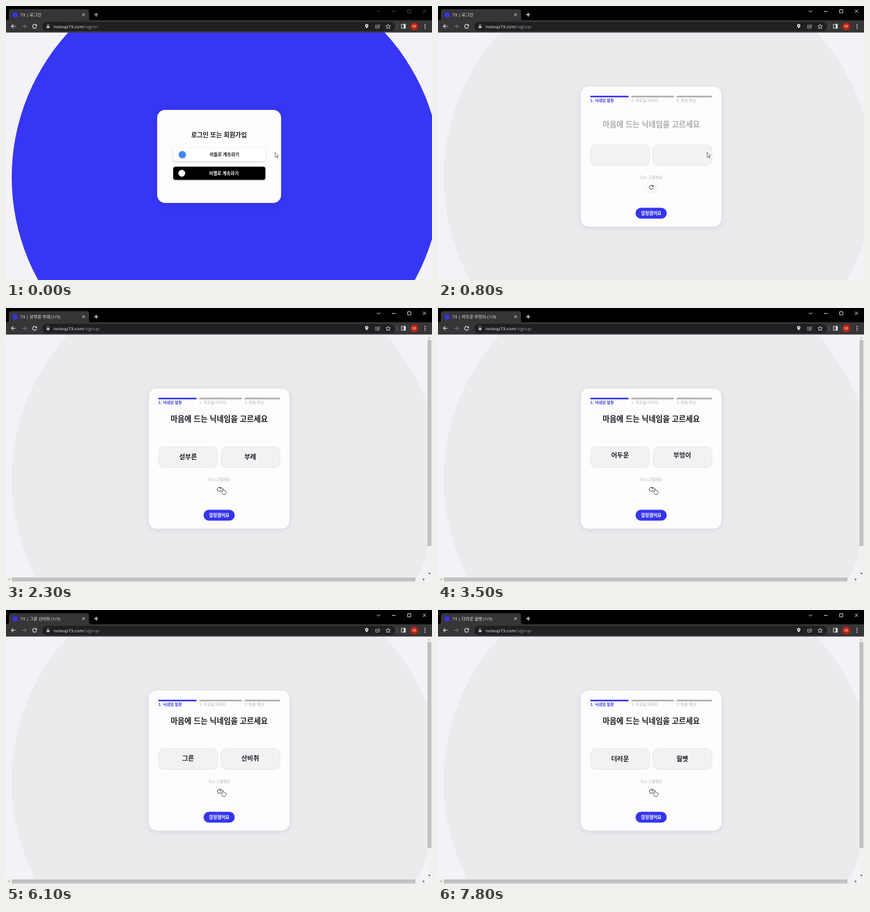
An HTML page that plays this animation: 744x480 px, repeating every 8 s.

```html
<!DOCTYPE html>
<html lang="ko">
<head>
<meta charset="utf-8">
<title>Nickname picker</title>
<style>
  html, body { margin: 0; width: 744px; height: 480px; overflow: hidden; background: #f4f2f6; }
  svg { display: block; }
  text { font-family: "Noto Sans CJK KR", "Noto Sans CJK", "Noto Sans", sans-serif; }
  .ui { font-family: "Open Sans", "Noto Sans CJK KR", sans-serif; }
  .b { font-weight: 700; }
  .mid { text-anchor: middle; }
  .ln { fill: none; stroke-width: 1; }
  .card { fill: #fefcff; filter: drop-shadow(0 2px 5px rgba(40, 40, 60, .1)); }
  .slot { fill: #f2f1f4; stroke: #e6e5e8; }
  .word { font-size: 11.2px; fill: #1c1b1f; }
</style>
</head>
<body>
<svg width="744" height="480" viewBox="0 0 744 480">
  <defs>
    <clipPath id="slots">
      <rect x="266" y="243" width="104" height="37" rx="9"/>
      <rect x="375" y="243" width="104" height="37" rx="9"/>
    </clipPath>
  </defs>

  <rect width="744" height="480" fill="#f4f2f6"/>
  <circle id="mark" cx="385" cy="300" r="375"/>

  <g id="signin">
    <rect class="card" x="264" y="182" width="216.5" height="163" rx="14"/>
    <text class="b mid" x="372" y="230" font-size="11" fill="#1c1b1f">로그인 또는 회원가입</text>
    <rect x="292" y="249" width="161" height="23" rx="4" fill="#fff" style="filter:drop-shadow(0 1px 1.5px rgba(0,0,0,.22))"/>
    <circle cx="308" cy="260.5" r="6.5" fill="#4285f4"/>
    <text class="b mid" x="381.5" y="263.4" font-size="7.7" fill="#1c1b1f">라둘로 계속하기</text>
    <rect x="292" y="281.5" width="161" height="23" rx="4" style="filter:drop-shadow(0 1px 1.5px rgba(0,0,0,.22))"/>
    <circle cx="307" cy="293" r="6" fill="#fff"/>
    <text class="b mid" x="380.5" y="296.2" font-size="7.7" fill="#fff">미젤로 계속하기</text>
  </g>

  <g id="signup">
    <rect class="card" x="249.5" y="141" width="245.5" height="245.5" rx="14"/>
    <rect x="266" y="157.3" width="67" height="2.6" rx="1" fill="#3435f0"/>
    <rect x="337.5" y="157.3" width="74.5" height="2.6" rx="1" fill="#adacaf"/>
    <rect x="416.5" y="157.3" width="62" height="2.6" rx="1" fill="#adacaf"/>
    <g class="b" font-size="6.75" fill="#adacaf">
      <text x="266" y="168.4" fill="#3435f0">1. 닉네임 설정</text>
      <text x="337.5" y="168.4" font-weight="500">2. 프로필 이모지</text>
      <text x="416.5" y="168.4" font-weight="500">3. 최종 확인</text>
    </g>
    <text id="heading" class="b mid" x="372.3" y="199" font-size="13.25" fill="#1c1b1f">마음에 드는 닉네임을 고르세요</text>
    <rect class="slot" x="266.5" y="243" width="103" height="36.5" rx="9"/>
    <rect class="slot" x="375.5" y="243" width="103" height="36.5" rx="9"/>
    <g clip-path="url(#slots)">
      <g id="words" class="b mid">
        <text id="left" class="word" x="318" y="265.2"></text>
        <text id="right" class="word" x="426.5" y="265.2"></text>
      </g>
    </g>
    <text class="mid" x="372.3" y="303.2" font-size="6.7" fill="#b3b2b6">다시 고를래요</text>
    <circle id="disc" cx="372.5" cy="317.5" r="8" fill="#fff"/>
    <g id="reload" class="ln" stroke="#1c1b1f">
      <path d="M375.6 315.9A3.5 3.5 0 1 0 376 318.3"/>
      <path d="M376.3 313.3V316.6H373Z" fill="#1c1b1f" stroke="none"/>
    </g>
    <rect x="345" y="353.5" width="54.5" height="19" rx="9.5" fill="#3435f0"/>
    <text class="b mid" x="372.3" y="366" font-size="7.8" fill="#fff">결정했어요</text>
  </g>

  <g id="bars">
    <path d="M735 46h9v434H0v-9h735Z" fill="#f1f1f1"/>
    <path d="M736 56h7v361h-7ZM10 472h705v7H10Z" fill="#c1c1c1"/>
    <path d="M737.3 53.3h4.4l-2.2-2.6ZM6.3 473.3v4.4l-2.6-2.2Z" fill="#a3a3a3"/>
    <path d="M737.3 464h4.4l-2.2 2.6ZM728.5 473.3v4.4l2.6-2.2Z" fill="#505050"/>
  </g>

  <rect width="744" height="25.5"/>
  <path d="M0 25H3Q5 25 5 21V10Q5 5.5 9.5 5.5H140.500Q145 5.500 145 10V21Q145 25 148 25H744V46.500H0Z" fill="#373538"/>
  <circle cx="16" cy="15.500" r="4.600" fill="#3435f0"/>
  <text id="tab" class="ui" x="25" y="18" font-size="7.400" fill="#eee"></text>
  <path class="ln" d="M133.300 13l4.400 4.400m0-4.400l-4.400 4.400" stroke="#eee"/>
  <path id="plus" class="ln" d="M154 15.200h7m-3.500-3.500v7" style="stroke-width:1.200"/>
  <g id="win" class="ln">
    <path d="M647.500 8l3 3 3-3M674 9.500h6.500M701.500 6.500h5.500v5.500h-5.500ZM728 6.500l5.500 5.500m0-5.500l-5.500 5.500"/>
  </g>

  <rect x="63" y="27.800" width="616" height="16.200" rx="8.100" fill="#202023"/>
  <g class="ln" stroke="#e8e8e8">
    <path d="M16.800 35.500H9.500m3.300-3.300l-3.300 3.300 3.300 3.300" style="stroke-width:1.200"/>
    <path d="M28 35.500h7.300m-3.300-3.300l3.300 3.300-3.300 3.300" stroke="#858388"/>
    <path d="M52.900 33.800A3.400 3.400 0 1 0 53.300 36.500" style="stroke-width:1.200"/>
    <path d="M54 31.800v3.300h-3.300Z" fill="#e8e8e8" stroke="none"/>
    <path d="M72 35v-1.400a1.500 1.500 0 0 1 3 0V35" stroke="#b9b9bc" style="stroke-width:.8"/>
    <rect x="71" y="35" width="5" height="3.800" rx=".6" fill="#b9b9bc" stroke="none"/>
    <path d="M630 39.200C628 36.600 627.200 35.500 627.200 34.300a2.800 2.800 0 0 1 5.600 0C632.800 35.500 632 36.600 630 39.200Z" fill="#e8e8e8" stroke="none"/>
    <circle cx="630" cy="34.200" r="1" fill="#202023" stroke="none"/>
    <path d="M648 33.500h-2.500v5.500h6v-1.500M647.500 37c.3-2 1.500-3 3.300-3v-1.800l2.600 2.700-2.600 2.600v-1.700c-1.500 0-2.500.4-3.300 1.200Z" stroke="#c5c5c8" style="stroke-width:.8"/>
    <path d="M667.500 31.800l1.200 2.700 2.900.3-2.200 1.900.7 2.900-2.600-1.600-2.600 1.600.7-2.900-2.200-1.900 2.900-.3Z" style="stroke-width:.9"/>
    <path d="M683.500 31v9" stroke="#6a686c"/>
    <rect x="690.600" y="32.100" width="7" height="6.800"/>
    <path d="M694.600 32h3v7h-3Z" fill="#e8e8e8" stroke="none"/>
  </g>
  <text class="ui" x="83" y="38.600" font-size="7.950" fill="#f2f2f2">nolvup73.com<tspan id="path" fill="#98979b"></tspan></text>
  <circle cx="713" cy="35.700" r="6.800" fill="#c0220f"/>
  <text class="ui mid" x="713" y="38.300" font-size="7.200" fill="#fff">M</text>
  <g fill="#e8e8e8">
    <circle cx="731.800" cy="32.500" r=".95"/><circle cx="731.800" cy="35.700" r=".95"/><circle cx="731.800" cy="38.900" r=".95"/>
  </g>

  <g id="arrow" fill="#fff" stroke="#333" stroke-width=".7" stroke-linejoin="round">
    <path d="M0 0V8.700L2 6.900 3.400 10 4.800 9.400 3.500 6.300H6.200Z"/>
  </g>
  <g id="hand" fill="#fff" stroke="#222" stroke-width=".7" stroke-linejoin="round">
    <path d="M-1 .8Q0-.6 1 .8V3.800Q2 3.200 2.600 4 3.500 3.600 4 4.400 5.200 4.200 5.300 5.400V7.500Q5.200 9 4.300 9.900V10.800H-.3V9.900L-3 6.600Q-3.200 5.300-2 5.500L-1 6.500Z"/>
  </g>
</svg>

<script>
const LOOP = 8000, STEP = 100;
const ACTIVE = 500, SIGNUP = 800;
const DROP = 560, RISE = 420, RISE_START = 705;

// time of each pick, adjective, noun
const picks = [
  [1286, '섣부른', '부레'], [2550, '푸른', '소나무'], [3186, '어두운', '부엉이'],
  [3790, '느긋한', '고래'], [4398, '예쁜', '산다화'], [5040, '수줍은', '너구리'],
  [5697, '그른', '산비취'], [6450, '맑은', '오솔길'], [6890, '용감한', '다람쥐'],
  [7320, '더러운', '웜뱃']
];
// time, x, y
const route = [[1600, 470, 256.5], [2000, 398, 361], [2300, 379, 316]];

const $ = id => document.getElementById(id);
const show = (id, on) => { $(id).style.display = on ? '' : 'none'; };
const shift = (id, x, y) => $(id).setAttribute('transform', `translate(${x} ${y})`);

const bez = (a, b, u) => 3 * a * u * (1 - u) ** 2 + 3 * b * u * u * (1 - u) + u ** 3;
function ease(x) {
  if (x <= 0) return 0;
  if (x >= 1) return 1;
  let lo = 0, hi = 1;
  for (let i = 0; i < 20; i++) {
    const m = (lo + hi) / 2;
    if (bez(.25, .25, m) < x) lo = m; else hi = m;
  }
  return bez(.1, 1, lo);
}

function pointer(t) {
  if (t <= route[0][0]) return route[0].slice(1);
  for (let i = 1; i < route.length; i++) {
    const [t0, x0, y0] = route[i - 1], [t1, x1, y1] = route[i];
    if (t < t1) {
      const k = (t - t0) / (t1 - t0), s = k * k * (3 - 2 * k);
      return [x0 + (x1 - x0) * s, y0 + (y1 - y0) * s];
    }
  }
  return route[route.length - 1].slice(1);
}

function drawChrome(t, pick) {
  const on = t >= ACTIVE;
  $('win').setAttribute('stroke', on ? '#e6e6e6' : '#4c4c4c');
  $('plus').setAttribute('stroke', on ? '#fff' : '#c4c4c4');
  $('path').textContent = t < SIGNUP ? '/signin' : '/signup';
  $('tab').textContent = '73 | ' + (pick ? `${pick[1]} ${pick[2]} (1/3)` : '로그인');
}

function drawPage(t, pick) {
  const joined = t >= SIGNUP;
  show('signin', !joined);
  show('signup', joined);
  show('bars', !!pick);
  $('mark').setAttribute('fill', joined ? '#ebeaed' : '#3636f4');

  const rise = ease((t - RISE_START) / RISE);
  shift('heading', 0, 20 * (1 - rise));
  $('heading').setAttribute('opacity', rise);

  const age = pick ? t - pick[0] : 0, fall = ease(age / DROP);
  $('left').textContent = pick ? pick[1] : '';
  $('right').textContent = pick ? pick[2] : '';
  shift('words', 0, -20 * (1 - fall));
  $('words').setAttribute('opacity', Math.min(1, fall * 1.7));
  $('reload').setAttribute('opacity', t > 2300 && age < STEP ? .5 : 1);
}

function drawPointer(t) {
  const [x, y] = pointer(t);
  const onButton = x > 345 && x < 400 && y > 353 && y < 373;
  const onReload = Math.hypot(x - 372.5, y - 317.5) < 9;
  const hand = onButton || onReload;
  show('hand', hand);
  show('arrow', !hand);
  shift(hand ? 'hand' : 'arrow', x, y);
  $('disc').style.filter = onReload
    ? 'drop-shadow(0 1px 2px rgba(40,40,60,.03))'
    : 'drop-shadow(0 1px 2px rgba(40,40,60,.12))';
}

function frame() {
  const t = Math.floor(performance.now() % LOOP / STEP) * STEP;
  const pick = picks.filter(p => p[0] <= t).pop();
  drawChrome(t, pick);
  drawPage(t, pick);
  drawPointer(t);
  requestAnimationFrame(frame);
}
frame();
</script>
</body>
</html>
```
